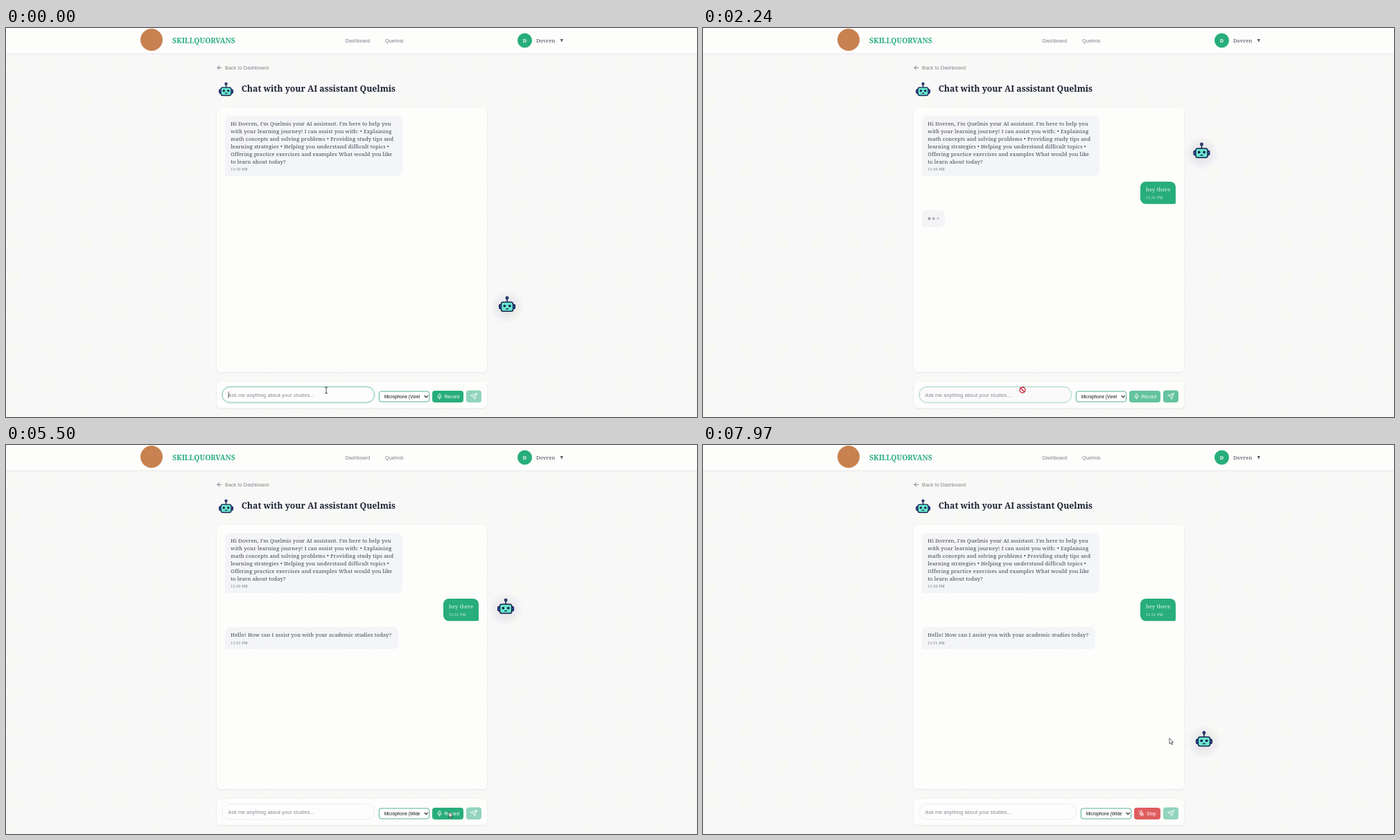
Animation of 997x562 px, one loop 8 s. Source, as an HTML page:

```html
<!DOCTYPE html>
<html lang="en">
<head>
<meta charset="utf-8">
<title>Study assistant chat</title>
<style>
html, body { margin: 0; width: 100%; height: 100%; overflow: hidden; background: #f8f8f9; }
svg { display: block; width: 100%; height: 100%; }
text { white-space: pre; }
.sans { font: 7.3px "Liberation Sans", Arial, sans-serif; fill: #7f828a; }
.serif { font: 7.45px "Noto Serif", serif; letter-spacing: .2px; fill: #3a404e; }
.bold { font-family: "Noto Serif", serif; font-weight: 700; }
.time { font: 5.4px "Noto Serif", serif; letter-spacing: .15px; fill: #747985; }
.option { font: 6.35px "Liberation Sans", Arial, sans-serif; fill: #111; }
.button { font: 6.7px "Liberation Sans", Arial, sans-serif; fill: #fff; }
.line { fill: none; stroke-linecap: round; stroke-linejoin: round; }
</style>
</head>
<body>
<svg viewBox="0 0 997 562" preserveAspectRatio="none">
  <defs>
    <radialGradient id="blob">
      <stop offset="0" stop-color="#f9f9f3"/>
      <stop offset=".5" stop-color="#f9f9f5"/>
      <stop offset="1" stop-color="#f9f9f6" stop-opacity="0"/>
    </radialGradient>
    <radialGradient id="halo">
      <stop offset="0" stop-color="#7f8394" stop-opacity=".24"/>
      <stop offset="1" stop-color="#7f8394" stop-opacity="0"/>
    </radialGradient>
    <linearGradient id="soft" x2="1" y2="1">
      <stop offset="0" stop-color="#f4f4f6"/>
      <stop offset="1" stop-color="#f3f5f8"/>
    </linearGradient>
    <pattern id="dots" width="51.9" height="51.2" x="-15.9" y="79.4" patternUnits="userSpaceOnUse">
      <ellipse cx="26" cy="25.6" rx="15" ry="17" fill="url(#blob)"/>
    </pattern>
    <filter id="shade" x="-5%" y="-20%" width="110%" height="150%">
      <feDropShadow dx="0" dy=".8" stdDeviation=".8" flood-color="#55565c" flood-opacity=".13"/>
    </filter>
    <clipPath id="label"><rect x="538" y="525" width="59.5" height="15"/></clipPath>
    <symbol id="robot" viewBox="0 0 24 24">
      <g stroke="#17224f" stroke-width="1.5" stroke-linejoin="round">
        <path d="M12 9V4"/>
        <circle cx="12" cy="2.8" r="1.6" fill="#4b72d8"/>
        <rect x=".9" y="12" width="4" height="6" rx="1.6" fill="#3d63c9"/>
        <rect x="19.1" y="12" width="4" height="6" rx="1.6" fill="#3d63c9"/>
        <rect x="3.6" y="8.6" width="16.8" height="13" rx="3" fill="#69e5cc"/>
      </g>
      <g fill="#17224f">
        <circle cx="8.4" cy="14" r="1.8"/><circle cx="15.6" cy="14" r="1.8"/>
        <rect x="10" y="17.4" width="4" height="1.5" rx=".7"/>
      </g>
    </symbol>
  </defs>

  <rect width="997" height="562" fill="#f8f8f9"/>
  <rect y="37" width="997" height="525" fill="url(#dots)"/>

  <rect y="-4" width="997" height="40.5" fill="#fdfdfc" filter="url(#shade)"/>
  <circle cx="210" cy="17" r="16" fill="#c88150"/>
  <text class="bold" x="240" y="21.8" font-size="10.35" fill="#28ad7d">SKILLQUORVANS</text>
  <text class="sans" x="489.7" y="20.8">Dashboard</text>
  <text class="sans" x="547" y="20.8">Quelmis</text>
  <circle cx="748.5" cy="18" r="10.5" fill="#28ad7d"/>
  <text class="bold" x="748.5" y="20.7" font-size="7" fill="#fff" text-anchor="middle">D</text>
  <text class="serif" x="765" y="20.8">Dovren</text>
  <path d="M799.6 16h4.4l-2.2 4.4z" fill="#555a66"/>

  <path class="line" d="M310.7 57.3h-5.6m2.6-2.7-2.7 2.7 2.7 2.7" stroke="#6b7080" stroke-width=".9"/>
  <text class="sans" x="316" y="60" letter-spacing=".06">Back to Dashboard</text>
  <use href="#robot" x="306.8" y="78.2" width="21.4" height="21.4"/>
  <text class="bold" x="339.7" y="92" font-size="12.25" fill="#1b2130">Chat with your AI assistant Quelmis</text>

  <rect x="304" y="115" width="390" height="382" rx="6" fill="#fdfdfc" filter="url(#shade)"/>
  <path d="M324 127H564a8 8 0 0 1 8 8V206a8 8 0 0 1-8 8H318a2 2 0 0 1-2-2V135a8 8 0 0 1 8-8z" fill="url(#soft)"/>
  <g id="intro" class="serif"></g>
  <text class="time" x="324.3" y="206">11:50 PM</text>

  <g id="sent">
    <path d="M639 222H674a8 8 0 0 1 8 8V252.3a2 2 0 0 1-2 2H639a8 8 0 0 1-8-8V230a8 8 0 0 1 8-8z" fill="#28ad7d"/>
    <text class="serif" x="639" y="236.3" style="fill:#e6f6ef">hey there</text>
    <text class="time" x="639" y="246.8" style="fill:#cfece1">11:51 PM</text>
  </g>
  <g id="wait">
    <path d="M324 263H341a8 8 0 0 1 8 8V280a8 8 0 0 1-8 8H318a2 2 0 0 1-2-2V271a8 8 0 0 1 8-8z" fill="#f4f4f6"/>
    <g id="pulse" fill="#6d7280">
      <circle cx="326.4" cy="275.3" r="2"/><circle cx="332.7" cy="275.3" r="2"/><circle cx="339" cy="275.3" r="2"/>
    </g>
  </g>
  <g id="reply">
    <path d="M324 263H558a8 8 0 0 1 8 8V287a8 8 0 0 1-8 8H318a2 2 0 0 1-2-2V271a8 8 0 0 1 8-8z" fill="url(#soft)"/>
    <text class="serif" x="324.3" y="277">Hello! How can I assist you with your academic studies today?</text>
    <text class="time" x="324.3" y="287.5">11:51 PM</text>
  </g>

  <rect x="304" y="511" width="390" height="38" rx="6" fill="#fdfdfc" filter="url(#shade)"/>
  <rect id="ring" x="311.2" y="517.7" width="221.1" height="24.1" rx="12" fill="none" stroke="#c5e9df" stroke-width="1.4"/>
  <rect id="field" x="312" y="518.5" width="219.5" height="22.5" rx="11.2" stroke="#e6e7ea" stroke-width=".8"/>
  <rect id="focus" x="312" y="518.5" width="219.5" height="22.5" rx="11.2" fill="none" stroke="#35b08c" stroke-width=".9"/>
  <text id="entry" class="sans" x="320.5" y="532.6" letter-spacing=".07"></text>
  <path id="caret" d="M0 525.5v9" stroke="#222" stroke-width=".7"/>

  <g id="picker">
    <rect x="538.3" y="525" width="72.4" height="15" rx="3" fill="#fff" stroke="#2b9a7c" stroke-width=".8"/>
    <g clip-path="url(#label)"><text id="device" class="option" x="545.8" y="535"></text></g>
    <path class="line" d="M604 531.4l2.2 2.3 2.2-2.3" stroke="#222" stroke-width="1.2"/>
  </g>

  <g id="record">
    <rect x="615" y="524" width="45" height="17" rx="4" fill="#28ad7d"/>
    <g class="line" stroke="#fff" stroke-width=".75">
      <rect x="624.2" y="528.5" width="2.6" height="4.8" rx="1.3"/>
      <path d="M622.7 532a2.8 2.8 0 0 0 5.6 0m-2.8 2.8v1.5"/>
    </g>
    <text class="button" x="632.5" y="535">Record</text>
  </g>
  <g id="stop">
    <rect x="622" y="524" width="38" height="17" rx="4" fill="#df5d5e"/>
    <g class="line" stroke="#fff" stroke-width=".75">
      <rect x="631.2" y="528.5" width="2.6" height="4.8" rx="1.3"/>
      <path d="M629.7 532a2.8 2.8 0 0 0 5.6 0m-2.8 2.8v1.5M629 528.6l7 7.4"/>
    </g>
    <text class="button" x="640" y="535">Stop</text>
  </g>
  <g id="send">
    <rect x="664" y="523.5" width="22" height="17.5" rx="4" fill="#28ad7d"/>
    <path class="line" d="M679.3 528l-3 8.4-1.7-3.7-3.7-1.7zl-4.7 4.7" stroke="#fff" stroke-width=".85"/>
  </g>

  <g id="menu">
    <rect x="538.3" y="461.3" width="77.4" height="62.7" fill="#fff" stroke="#777" stroke-width=".7"/>
    <rect id="hover" x="538.7" width="76.6" height="12.5" fill="#1a66c9"/>
    <g id="options"></g>
  </g>

  <g id="floater">
    <circle cy="4" r="25" fill="url(#halo)"/>
    <use href="#robot" x="-12.3" y="-11.8" width="24.6" height="24.6"/>
  </g>

  <path id="beam" class="line" d="M-1.7-4.5Q0-4.5 0-3.3Q0-4.5 1.7-4.5M0-3.5V3.5M-1.7 4.5Q0 4.5 0 3.3Q0 4.5 1.7 4.5" stroke="#222" stroke-width=".8"/>
  <path id="denied" d="M-2.7-2.7L2.7 2.7M4 0A4 4 0 1 1-4 0A4 4 0 1 1 4 0" fill="none" stroke="#c51a30" stroke-width="1.3"/>
  <path id="arrow" d="M0 0V8.3L1.9 6.5L3.2 9.5L4.5 8.9L3.2 6H5.7z" fill="#fff" stroke="#222" stroke-width=".7"/>
</svg>
<script>
const LOOP = 8;
const SENT = 2.05, REPLY = 3.6, OPEN = 4.05, CHOSEN = 4.98, RECORD = 5.8;
const keyTimes = [.55, .7, .95, 1.1, 1.24, 1.36, 1.5, 1.62, 1.76];
const message = "hey there";
const hint = "Ask me anything about your studies...";
const devices = ["Microphone (Vorel Mi...", "Microphone (Zelk D41...", "Microphone (Wide Arc...", "Default - Microphone...", "Communications - Mic..."];
const intro = [
  "Hi Dovren, I'm Quelmis your AI assistant. I'm here to help you",
  "with your learning journey! I can assist you with: • Explaining",
  "math concepts and solving problems • Providing study tips and",
  "learning strategies • Helping you understand difficult topics •",
  "Offering practice exercises and examples What would you like",
  "to learn about today?"
];
// time, height, speed of the floating robot
const drift = [[0, 399, -65], [.8, 335, -104], [2.24, 177, -91], [3.34, 119, -20], [4.7, 155, 78], [6.3, 322, 106], [8, 425, 9]];
// time, x, y of the pointer
const pointer = [[0, 462, 523.5], [2.1, 462, 523.5], [2.24, 461, 523], [2.6, 461, 523], [3.2, 615.5, 529], [3.5, 615.5, 529],
  [3.95, 601, 532], [4.15, 601, 532], [4.6, 607.5, 495], [5.05, 607.5, 495], [5.55, 640, 531], [5.83, 640, 531], [6.3, 486, 463.5],
  [6.75, 486, 463.5], [7.7, 673, 423.5], [8, 673, 423.5]];

const el = {};
document.querySelectorAll("svg [id]").forEach(node => el[node.id] = node);
const set = (id, name, value) => el[id].setAttribute(name, value);
const fade = (id, value) => set(id, "opacity", value);
const show = (id, on) => set(id, "display", on ? "inline" : "none");
const move = (id, x, y) => set(id, "transform", `translate(${x} ${y})`);
const clamp = v => Math.max(0, Math.min(1, v));
const ease = v => { v = clamp(v); return v * v * (3 - 2 * v); };
const since = (t, start, span) => ease((t - start) / span);

el.intro.innerHTML = intro.map((s, i) => `<text x="324.3" y="${141.3 + i * 10.95}">${s}</text>`).join("");
el.options.innerHTML = devices.map((s, i) => `<text class="option" x="545.8" y="${470.6 + i * 12.5}">${s}</text>`).join("");

function segment(keys, t) {
  let i = 0;
  while (i < keys.length - 2 && t >= keys[i + 1][0]) i++;
  const a = keys[i], b = keys[i + 1], span = b[0] - a[0];
  return [a, b, (t - a[0]) / span, span];
}

function robotY(t) {
  const [a, b, u, span] = segment(drift, t);
  return a[1] + (b[1] - a[1]) * ease(u) + span * u * (1 - u) * (a[2] * (1 - u) - b[2] * u);
}

function pointerAt(t) {
  const [a, b, u] = segment(pointer, t), s = ease(u);
  return [a[1] + (b[1] - a[1]) * s, a[2] + (b[2] - a[2]) * s];
}

function drawInput(t) {
  const typed = t < SENT ? message.slice(0, keyTimes.filter(k => k <= t).length) : "";
  const focus = t < SENT ? .6 + .4 * since(t, 0, .25) : 1 - since(t, SENT, .32);
  const waiting = t >= SENT && t < REPLY;
  const recording = t >= RECORD;

  el.entry.textContent = typed || hint;
  el.entry.style.fill = typed ? "#20242e" : "#858994";
  move("caret", 321 + (typed ? el.entry.getComputedTextLength() : 0), 0);
  show("caret", t < SENT);
  set("field", "width", recording ? 227 : 219.5);
  set("field", "fill", waiting ? "#fafafb" : "#fdfdfd");
  fade("focus", focus);
  fade("ring", focus);

  move("picker", recording ? 7 : 0, 0);
  el.device.textContent = devices[t < CHOSEN ? 0 : 2].slice(0, t < CHOSEN ? 17 : 16);
  show("record", !recording);
  show("stop", recording);
  fade("record", 1 - .4 * (since(t, SENT, .3) - since(t, REPLY, .2)));
  fade("stop", .87 + .13 * Math.cos(Math.PI * (t - 5.92)));
  fade("send", .5 + .5 * (since(t, keyTimes[0], .2) - since(t, SENT, .35)));
}

function drawChat(t) {
  fade("sent", since(t, SENT, .15));
  show("wait", t >= SENT && t < REPLY);
  fade("wait", since(t, SENT, .15));
  [...el.pulse.children].forEach((dot, i) => {
    const beat = Math.max(0, Math.cos(2 * Math.PI * ((t - 2.24) / 1.4 - i * .14)));
    dot.setAttribute("opacity", .32 + .33 * beat);
    dot.setAttribute("r", 1.75 + .35 * beat);
  });
  fade("reply", since(t, REPLY, .2));
}

function drawPointer(t) {
  const [x, y] = pointerAt(t);
  const blocked = t >= SENT && t < REPLY && (x < 532 || x > 612);
  const kind = t < SENT ? "beam" : blocked ? "denied" : "arrow";
  for (const id of ["beam", "denied", "arrow"]) {
    show(id, id === kind);
    move(id, x, y);
  }
  const row = y > 524 ? 0 : Math.max(0, Math.min(4, Math.floor((y - 461.5) / 12.5)));
  show("menu", t >= OPEN && t < CHOSEN);
  set("hover", "y", 461.6 + row * 12.5);
  [...el.options.children].forEach((item, i) => item.style.fill = i === row ? "#fff" : "#111");
}

function draw(t) {
  drawInput(t);
  drawChat(t);
  drawPointer(t);
  move("floater", 721.4 + 2 * Math.cos(Math.PI / 2 * (t - .4)), robotY(t));
}

function tick() {
  draw(performance.now() / 1000 % LOOP);
  requestAnimationFrame(tick);
}
tick();
</script>
</body>
</html>
```
